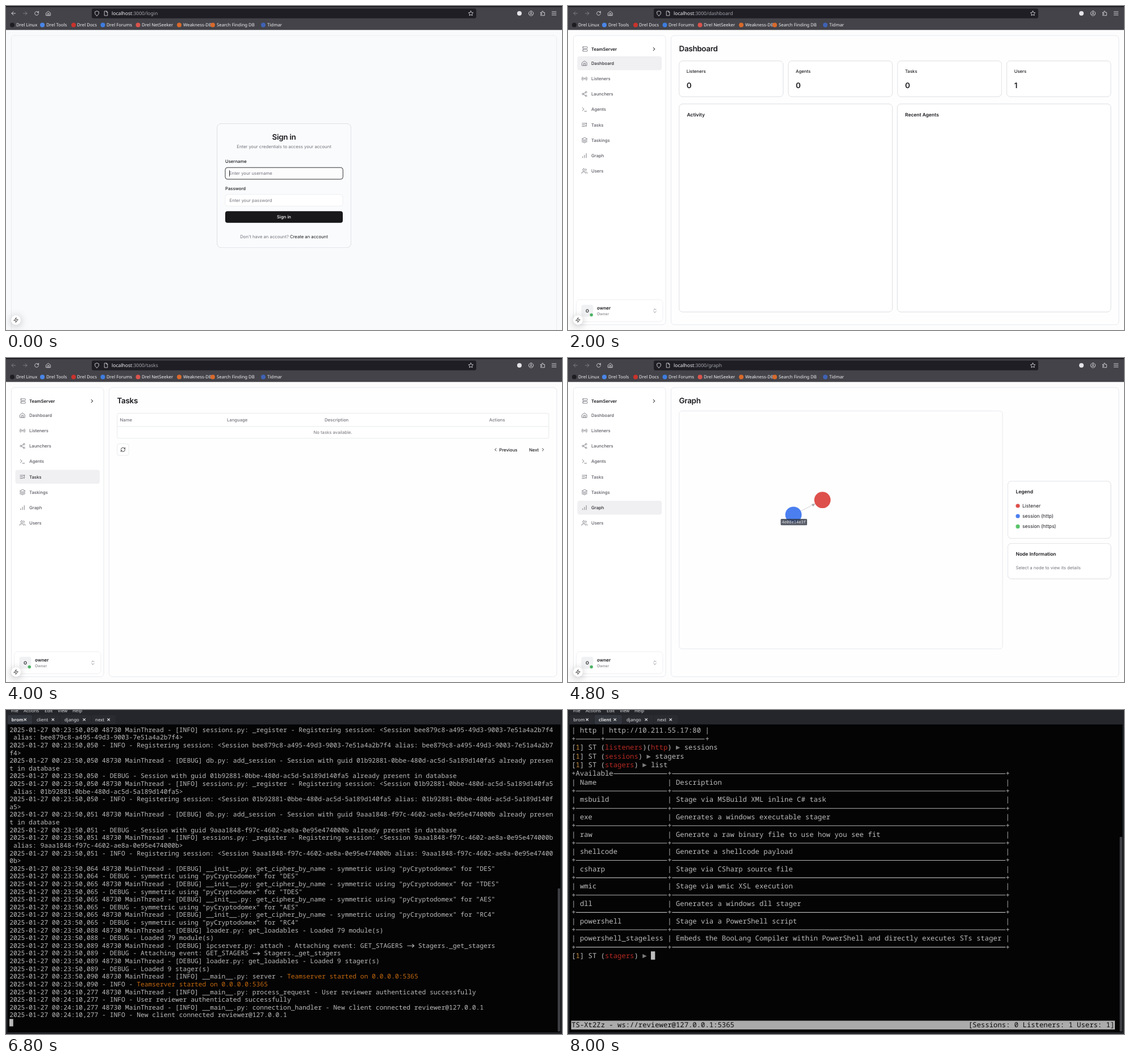
An HTML page that plays this animation: 979x572 px, repeating every 8.4 s.

```html
<!DOCTYPE html>
<html lang="en">
<head>
<meta charset="utf-8">
<title>Team server walkthrough</title>
<style>
  html, body { margin: 0; width: 100%; height: 100%; overflow: hidden; background: #fdfdfe; }
  svg { display: block; width: 979px; height: 572px; text-rendering: geometricPrecision; }
  text { white-space: pre; font-family: Inter, sans-serif; }
  .chrome { font-family: "Noto Sans", "Open Sans", sans-serif; }
  .code { font-family: "Liberation Mono", monospace; }
  .term { font-family: "Noto Sans Mono", "DejaVu Sans Mono", monospace; }
  .card { filter: drop-shadow(0 .7px .7px #0002); }
  .float { filter: drop-shadow(0 2px 7px #0004); }
</style>
</head>
<body>
<svg id="stage" viewBox="0 0 979 572"></svg>
<script>
const STEP = 400;
const INK = '#1b1b20', GREY = '#74747d', LINE = '#e5e7eb', SOFT = '#f0f1f3', BLUE = '#365fe2';

const ICONS = {
  home: 'M3 10 12 3l9 7v11H3zM9 21v-9h6v9',
  radio: 'M4.9 19.1C1 15.2 1 8.8 4.9 4.9M7.8 16.2c-2.3-2.3-2.3-6.1 0-8.5M16.2 7.8c2.3 2.3 2.3 6.1 0 8.5M19.1 4.9C23 8.8 23 15.1 19.1 19M12 10a2 2 0 1 0 .01 0',
  share: 'M18 2a3 3 0 1 0 .01 0M6 9a3 3 0 1 0 .01 0M18 16a3 3 0 1 0 .01 0M8.6 13.5l6.8 4M15.4 6.5l-6.8 4',
  prompt: 'M4 17l6-6-6-6M12 19h8',
  list: 'M3 6h18M3 12h10M3 18h10M19 6v12l-4-3',
  layers: 'M12 2 2 7l10 5 10-5zM2 12l10 5 10-5M2 17l10 5 10-5',
  bars: 'M5 20v-4M12 20V10M19 20V4',
  users: 'M16 21v-2a4 4 0 0 0-4-4H6a4 4 0 0 0-4 4v2M9 3a4 4 0 1 0 .01 0M22 21v-2a4 4 0 0 0-3-3.9M16 3.1a4 4 0 0 1 0 7.8',
  server: 'M4 2h16a2 2 0 0 1 2 2v4a2 2 0 0 1-2 2H4a2 2 0 0 1-2-2V4a2 2 0 0 1 2-2zM4 14h16a2 2 0 0 1 2 2v4a2 2 0 0 1-2 2H4a2 2 0 0 1-2-2v-4a2 2 0 0 1 2-2zM6 6h.1M6 18h.1',
  right: 'M9 18l6-6-6-6', left: 'M15 18l-6-6 6-6', down: 'M6 9l6 6 6-6',
  updown: 'M7 15l5 5 5-5M7 9l5-5 5 5',
  refresh: 'M3 12a9 9 0 0 1 9-9 9.75 9.75 0 0 1 6.7 2.7L21 8M21 3v5h-5M21 12a9 9 0 0 1-9 9 9.75 9.75 0 0 1-6.7-2.7L3 16M8 16H3v5',
  copy: 'M9 9h13v13H9zM5 15H2V2h13v3',
  plus: 'M5 12h14M12 5v14',
  back: 'M12 19l-7-7 7-7M20 12H5', forward: 'M12 5l7 7-7 7M4 12h15',
  bolt: 'M13 2 3 14h9l-1 8 10-12h-9z',
  gear: 'M12 9a3 3 0 1 0 .01 0M12 2l8.7 5v10L12 22l-8.7-5V7z',
  shield: 'M12 22s8-4 8-10V5l-8-3-8 3v7c0 6 8 10 8 10z',
  page: 'M14 2H5v20h14V7zM14 2v5h5',
  key: 'M6 8a4 4 0 1 0 .01 0M10 12h12v4M18 12v3',
  reload: 'M20 12a8 8 0 1 1-2.5-5.8L20 8M20 3v5h-5',
  star: 'M12 2l3.1 6.3 6.9 1-5 4.9 1.2 6.8-6.2-3.2L5.800 21 7 14.200 2 9.300l6.900-1z',
  account: 'M12 2a10 10 0 1 0 .01 0M12 7a3 3 0 1 0 .01 0M6 18c2-4 10-4 12 0',
  puzzle: 'M4 8h5V5a2.500 2.500 0 0 1 5 0v3h6v13H4v-5h3a2 2 0 0 0 0-4H4z',
  menu: 'M3 5h18M3 12h18M3 19h18'
};

const escapeText = s => s.replace(/&/g, '&amp;').replace(/</g, '&lt;').replace(/>/g, '&gt;');

// y is the vertical centre of the capitals
function text(str, x, y, { size = 7.7, fill = INK, weight = 400, anchor = 'start', cls = '', spacing = 0 } = {}) {
  return `<text class="${cls}" x="${x}" y="${y + size * .36}" font-size="${size}" fill="${fill}" font-weight="${weight}" text-anchor="${anchor}" letter-spacing="${spacing}">${escapeText(str)}</text>`;
}
const muted = (str, x, y, o) => text(str, x, y, { fill: GREY, ...o });
const strong = (str, x, y, o) => text(str, x, y, { weight: 500, ...o });
const middle = (str, x, y, o) => text(str, x, y, { anchor: 'middle', ...o });
const heading = (str, x, y, o) => text(str, x, y, { size: 13.4, weight: 600, spacing: -.28, ...o });
const cardTitle = (str, x, y) => text(str, x, y, { size: 8.45, weight: 600 });

const rect = (x1, y1, x2, y2, fill = 'none', r = 0, stroke = 'none', cls = '') =>
  `<rect class="${cls}" x="${x1}" y="${y1}" width="${x2 - x1}" height="${y2 - y1}" rx="${r}" fill="${fill}" stroke="${stroke}" stroke-width=".9"/>`;
const card = (x1, y1, x2, y2) => rect(x1, y1, x2, y2, '#fff', 6, '#e2e4e8', 'card');
const dot = (x, y, r, fill) => `<circle cx="${x}" cy="${y}" r="${r}" fill="${fill}"/>`;
const path = (d, stroke, width = 1) => `<path d="${d}" fill="none" stroke="${stroke}" stroke-width="${width}"/>`;
const icon = (name, x, y, size = 11, stroke = GREY, width = 2) =>
  `<path d="${ICONS[name]}" transform="translate(${x - size / 2} ${y - size / 2}) scale(${size / 24})" fill="none" stroke="${stroke}" stroke-width="${width}" stroke-linecap="round" stroke-linejoin="round"/>`;

function field(x1, y1, x2, value, fill = INK, stroke = LINE) {
  return rect(x1, y1, x2, y1 + 20.5, '#fff', 4, stroke) + text(value, x1 + 7.5, y1 + 10.3, { fill });
}
function button(x1, y1, x2, label, fill) {
  return rect(x1, y1, x2, y1 + 20.5, fill, 4) + middle(label, (x1 + x2) / 2, y1 + 10.3, { fill: '#fff', weight: 500 });
}
function tabBar(x1, y1, x2, labels) {
  const w = (x2 - x1) / labels.length;
  return rect(x1, y1, x2, y1 + 19.5, SOFT, 4) + rect(x1 + 1.7, y1 + 1.7, x1 + w - .7, y1 + 17.8, '#fff', 3, '#ececef') +
    labels.map((s, i) => middle(s, x1 + w * (i + .5), y1 + 9.7, { weight: 500, fill: i ? GREY : INK })).join('');
}

// ---- browser ----
const BOOKMARKS = [
  ['Drel Linux', 11, 18, '#1d1d22'], ['Drel Tools', 64, 71, '#4a86e8'], ['Drel Docs', 119, 125, '#c9332c'],
  ['Drel Forums', 170.5, 177, '#3d7de0'], ['Drel NetSeeker', 232.5, 239, '#d9534c'], ['Weakness-DB', 305, 312, '#d9692b'],
  ['Search Finding DB', 364, 371, '#d9692b'], ['Tidmar', 453, 460, '#3f62b5']
];
function browser(route, { canGoBack = false, key = false } = {}) {
  const light = '#e4e4e8', dim = '#85858c', x = key ? 202 : 186;
  const tools = [['reload', 54], ['home', 74.5], ['account', 924.5], ['puzzle', 945], ['menu', 965]];
  return rect(0, 0, 979, 42.3, '#434349') + rect(0, 0, 979, 1.8, '#1c1b22') + rect(151, 4.500, 828, 21.800, '#1f1e25', 3) +
    icon('back', 13, 13, 10.5, canGoBack ? light : dim) + icon('forward', 34, 13, 10.5, dim) +
    tools.map(([n, tx]) => icon(n, tx, 13, 10, light)).join('') + dot(904, 13, 4, light) +
    icon('shield', 160, 13, 10, light) + icon('page', 176, 13, 9.5, light) + icon('star', 818.500, 13, 10, light) +
    (key ? icon('key', 192, 13, 10, light) : '') +
    `<text class="chrome" x="${x}" y="16.300" font-size="8.55" fill="#a3a3ab"><tspan fill="#f4f4f6">localhost</tspan>:3000/${route}</text>` +
    BOOKMARKS.map(([s, ix, tx, c]) => dot(ix, 33.5, 4, c) + text(s, tx, 33.5, { size: 7.8, fill: '#f0f0f3', cls: 'chrome' })).join('');
}
const devBadge = `<circle class="float" cx="17.5" cy="554.500" r="8.500" fill="#fff"/>` + icon('bolt', 17.5, 554.5, 10, '#333');

// ---- application shell ----
const NAV = [['Dashboard', 'home'], ['Listeners', 'radio'], ['Launchers', 'share'], ['Agents', 'prompt'],
  ['Tasks', 'list'], ['Taskings', 'layers'], ['Graph', 'bars'], ['Users', 'users']];
function sidebar(active) {
  return rect(9.5, 52, 172, 562.8, '#fff', 6, LINE) +
    icon('server', 30, 76, 10) + text('TeamServer', 41, 76, { weight: 600 }) + icon('right', 151.5, 76, 10, INK, 2.500) +
    NAV.map(([name, ic], i) => {
      const y = 101 + 27.2 * i, on = name === active;
      return (on ? rect(16.5, y - 12.3, 165, y + 12.2, '#f0f0f2', 4) : '') + icon(ic, 29, y, 11) +
        strong(name, 41, y, { fill: on ? '#2c2c33' : '#5a5a63' });
    }).join('') +
    rect(14.5, 518.5, 167, 557.5, '#fff', 6, '#eceef1') + rect(23.5, 527.5, 44.5, 548.5, SOFT, 4) +
    middle('O', 34, 538, { weight: 600 }) + dot(41.2, 545.3, 3.6, '#fff') + dot(41.2, 545.3, 2.800, '#4fb466') +
    text('owner', 51, 533.5, { weight: 600, size: 8 }) + muted('Owner', 51, 543.2, { size: 6.7 }) + icon('updown', 153, 538, 10);
}
function app(active, route, content, { bottom = 562.8, scroll = 0, over = '', ...nav } = {}) {
  return rect(0, 0, 979, 572, '#fdfdfe') +
    `<g transform="translate(0 ${-scroll})">${rect(181.5, 52, 969.800, bottom, '#fefefe', 6, LINE)}${content}</g>` +
    sidebar(active) + devBadge + over + browser(route, nav);
}

// ---- pages ----
function login() {
  return rect(0, 0, 979, 572, '#f9fafc') + rect(9.5, 52, 969.5, 600, 'none', 6, '#e8eaee') +
    rect(371.8, 207.8, 607.300, 426.5, '#fafbfc', 7, '#e1e4e9', 'card') +
    heading('Sign in', 489.5, 231.3, { anchor: 'middle' }) +
    middle('Enter your credentials to access your account', 489.5, 247.8, { fill: GREY }) +
    strong('Username', 386, 274.5) + rect(386, 285.2, 593.3, 305.8, '#fcfcfd', 4, '#1d1d22') +
    muted('Enter your username', 393, 295.5) + path('M393.500 290v11', INK, .9) +
    strong('Password', 386, 322.2) + field(386, 332.8, 593, 'Enter your password', GREY, '#eceef1') +
    button(386, 362.2, 593, 'Sign in', '#18181b') +
    `<text x="489.5" y="409.500" font-size="7.7" fill="${GREY}" text-anchor="middle">Don't have an account? <tspan fill="${INK}">Create an account</tspan></text>` +
    devBadge + browser('login', { canGoBack: true });
}

function logsCard(y) {
  return card(209.3, y, 942.3, y + 250) + cardTitle('Server Logs', 223, y + 27) +
    rect(870, y + 18, 910.5, y + 39.5, '#fff', 4, LINE) + text('All', 877, y + 28.8) + icon('down', 899, y + 28.8, 9) +
    rect(915.5, y + 18.5, 928, y + 39, '#fff', 4, LINE) + icon('refresh', 921.8, y + 28.8, 9.500, INK) +
    rect(223, y + 52, 928, y + 236, '#fafafb', 4, LINE);
}
function teamServer(running) {
  const status = running ? 'Running' : 'Stopped';
  const stats = [['Connected Clients: 0', 731.5], ['Active Port: 6000', 817], ['Mode: WS', 891]];
  let out = heading('TeamServer', 195.5, 75.500) + card(209.3, 107, 942.3, 398.3) +
    icon('server', 230, 130, 15, INK) + heading('TeamServer Control Panel', 241, 130.3) +
    muted('Manage and monitor your TeamServer instance', 223, 148.2) +
    rect(223, 167.5, 278.3, 189, '#18181b', 10.7) + middle(status, 250.6, 178.5, { size: 10.2, weight: 600, fill: '#fff' }) +
    tabBar(223.3, 203, 928, ['Server Settings', 'Security']) +
    strong('IP Binding', 223, 235) + field(223.3, 246.5, 570.8, '0.0.0.0 (All Interfaces)') + icon('down', 559, 257, 9) +
    strong('Port', 580, 235) + field(580.2, 245.6, 928, '6000') +
    strong('Password', 223, 285) + field(223.3, 295.6, 570.8, '') +
    [0, 1, 2, 3, 4].map(i => dot(234.2 + 6.95 * i, 306.300, 3, INK)).join('') +
    strong('Advanced Options', 232.3, 339.8) +
    button(223, 363.300, 285.700, running ? 'Stop Server' : 'Start Server', running ? '#cd3a32' : '#18181b');
  if (!running) return out + logsCard(411.8);
  return out + muted('Uptime: 00:00:09', 287, 178.2) + stats.map(([s, x]) => text(s, x, 178.2)).join('') +
    card(209.3, 411.8, 942.3, 506.8) + cardTitle('Connection Details', 223, 430.6) +
    rect(223, 448.5, 324.5, 470.8, SOFT, 2) + text('ws://0.0.0.0:6000', 227.5, 459.8, { size: 9.13, cls: 'code' }) +
    rect(907.8, 449.8, 928, 469.8, '#fff', 4, LINE) + icon('copy', 917.8, 459.8, 9.5, INK) +
    text('Quick connect command:', 223, 486.2) + rect(320.3, 479.5, 496.3, 492.800, SOFT, 2) +
    text('teamserver connect ws://0.0.0.0:6000', 323, 486.2, { size: 7.92, cls: 'code' }) + logsCard(520.500);
}

function table(y, columns, row) {
  return rect(195.8, y, 955.8, y + 44.3, '#fff', 3, LINE) + path(`M196 ${y + 23.5}H955.500`, LINE, .9) +
    columns.map(([s, x]) => strong(s, x, y + 12, { fill: GREY })).join('') + middle(row, 575.500, y + 34, { fill: GREY });
}
const pager = y => icon('left', 862, y, 9, INK, 2.5) + strong('Previous', 868.5, y) + strong('Next', 921, y) + icon('right', 945.5, y, 9, INK, 2.5);
const refreshButton = (x, y) => rect(x, y, x + 20.5, y + 20.5, '#fff', 4, LINE) + icon('refresh', x + 10.2, y + 10.2, 9.500, INK);

const tablePage = (title, columns, row) => heading(title, 195.5, 75.5) + table(97.500, columns, row) + refreshButton(195.8, 151.500) + pager(161.8);

const listeners = heading('Listeners', 195.5, 75.5) + rect(195.5, 97.5, 316.5, 117.5, SOFT, 4) + rect(197.500, 99.500, 259, 115.800, '#fff', 3) +
  icon('radio', 209, 107.8, 9.500, INK) + strong('Listeners', 218, 107.8) + icon('gear', 270, 107.8, 9) + strong('Profiles', 279, 107.8, { fill: GREY }) +
  table(127.2, [['Status', 200.5], ['Name', 299], ['Listener Type', 389], ['Host', 561], ['Port', 639], ['Start Time', 711.5], ['Actions', 850.8]], 'No listeners available.') +
  rect(195.500, 181, 284.3, 201.3, BLUE, 4) + icon('plus', 209, 191.1, 9, '#fff') + strong('Create Listener', 218, 191.1, { fill: '#fff' }) +
  refreshButton(289, 181) + pager(191.1);

const dashboard = heading('Dashboard', 195.5, 75.5) +
  ['Listeners', 'Agents', 'Tasks', 'Users'].map((s, i) => {
    const x = 195.8 + 192.3 * i;
    return card(x, 97, x + 183, 160) + strong(s, x + 13, 115) + heading(i === 3 ? '1' : '0', x + 13, 140);
  }).join('') +
  card(195.8, 173, 571, 540) + cardTitle('Activity', 209.5, 192) + card(580, 173, 955.8, 540) + cardTitle('Recent Agents', 593.5, 192);

const graph = heading('Graph', 195.5, 75.5) + rect(195.8, 93.5, 765.3, 513.5, '#fefefe', 5, LINE) +
  path('M409 270.500 430 260', '#d2d2d4') + '<path d="M435.500 257l-3.800 5.200-3-4.200z" fill="#a9a9ad"/>' +
  dot(448, 250.7, 14.4, '#de504c') + dot(397, 276.8, 14.4, '#4b7ff0') + rect(374.500, 284, 421, 295.3, '#333947d0', 1.500) +
  middle('4e08e14e3f', 397.7, 289.8, { size: 7.05, fill: '#e4e4e8', cls: 'term' }) +
  card(774.5, 217.5, 955.8, 318.3) + cardTitle('Legend', 788.5, 236.3) +
  [['Listener', '#de504c'], ['session (http)', '#4b7ff0'], ['session (https)', '#5bc46c']].map(([s, c], i) =>
    dot(792, 261 + 18.2 * i, 3.600, c) + text(s, 800, 261 + 18.2 * i, { size: 8.5 })).join('') +
  card(774.5, 327.5, 955.8, 389.8) + cardTitle('Node Information', 788.5, 346.2) + muted('Select a node to view its details', 788.5, 369.8);

function required(label, x, y) {
  return `<text x="${x}" y="${y + 2.8}" font-size="7.7" font-weight="500" fill="${INK}">${label} <tspan fill="#e0433c">*</tspan></text>`;
}
const createListener = icon('back', 209, 76, 9, INK, 2.5) + strong('Back', 218, 76) + heading('Create Listener', 255.3, 76.5) +
  tabBar(195.5, 100.3, 955.5, ['HTTP Listener', 'HTTPS Listener', 'WMI Listener']) + card(195.8, 125.2, 955.8, 361.8) +
  strong('Description', 209.7, 146.4) + field(209.8, 157, 941.5, 'Listens on HTTP protocol.', '#8b8b93', '#f0f1f4') +
  required('Name', 209.7, 190.4) + field(209.8, 199, 941.5, 'Enter listener name', GREY) +
  required('BindAddress', 209.7, 232.4) + field(209.8, 241, 571, '0.0.0.0') +
  required('BindPort', 580, 232.4) + field(580.2, 241, 941.5, '80') +
  strong('Comms', 209.7, 278) + field(209.8, 288.5, 941.5, 'HTTP', '#8b8b93', '#f0f1f4') +
  button(898.5, 327, 941.5, 'Create', BLUE);

const usersPage = tablePage('Users', [['Username', 200.5], ['Role', 389], ['Status', 561], ['Last Login', 711.5], ['Actions', 850.8]], 'owner');
const userDrawer = rect(-2, 379.5, 981, 580, '#fff', 6, LINE) + rect(460, 387, 519, 391, SOFT, 2) +
  heading('Create User', 489.500, 410, { anchor: 'middle' }) + strong('Username', 386, 436) + field(386, 445, 593, 'Enter username', GREY) +
  strong('Password', 386, 480) + field(386, 489, 593, 'Enter password', GREY) + button(386, 524, 593, 'Create', '#18181b');

// ---- terminal ----
// {x|words} colours words; runs of dashes and "->" are drawn as joined strokes
const TONES = { o: '#c4690f', n: '#c08a3a', r: '#b52a22', g: '#7d7d7d' };
function console_(rows, { cell, leading, top }) {
  const left = 6.2;
  return rows.map((row, r) => {
    const y = top + r * leading;
    const plain = row.replace(/\{\w\|(.*?)\}/g, '$1');
    const strokes = [...plain.matchAll(/-{4,}|->/g)].map(m => {
      const x1 = left + m.index * cell, x2 = x1 + m[0].length * cell - 1;
      return path(`M${x1 + .5} ${y + .5}H${x2}` + (m[0] === '->' ? `m-3.500-3 3.500 3-3.500 3` : ''), '#b4b4b4', 1.1);
    }).join('');
    const body = escapeText(row.replace(/-{4,}|->/g, m => ' '.repeat(m.length)))
      .replace(/\{(\w)\|(.*?)\}/g, (_, tone, s) => `<tspan fill="${TONES[tone]}">${s}</tspan>`);
    return `<text class="term" x="${left}" y="${y + cell * .6}" font-size="${cell / .6}" fill="#bcbcbc">${body}</text>` + strokes;
  }).join('');
}
function terminal(active, thumb, content) {
  const tabs = [['brom', 9.5, 3, 46], ['client', 54, 47, 95], ['django', 103, 96, 150], ['next', 157, 151, 193]];
  return rect(0, 0, 979, 572, '#24262b') +
    [['File', 9], ['Actions', 31], ['Edit', 68], ['View', 91], ['Help', 117]].map(([s, x]) => text(s, x, 1, { size: 7.9, fill: '#dcdcde', cls: 'chrome' })).join('') +
    tabs.map(([s, x, x1, x2]) => {
      const on = s === active;
      return rect(x1, 9, x2, 25, on ? '#33363d' : '#292b31', 2) +
        text(s, x, 17, { size: 7.9, fill: '#e2e2e4', weight: on ? 700 : 400, cls: 'chrome' }) +
        path(`M${x2 - 14.500} 14.800l4.400 4.400m0-4.400l-4.400 4.400`, '#e2e2e4', 1.2);
    }).join('') +
    rect(2.5, 25.500, 976.5, 569, '#040405') + rect(971.5, thumb, 975.8, 567.500, '#3f4147', 1) + content;
}

function serverLog() {
  const rows = [], columns = 141;
  const log = (time, level, file, call, message) => {
    const stamp = `2025-01-27 00:${time}`;
    for (const line of [`${stamp} 48730 MainThread - [${level}] ${file}.py: ${call} - ${message}`, `${stamp} - ${level} - ${message}`])
      if (line.length <= columns) rows.push(line);
      else rows.push(line.slice(0, columns), line.slice(columns));
  };
  const add = (ms, id) => log(`23:50,${ms}`, 'DEBUG', 'db', 'add_session', `Session with guid ${id} already present in database`);
  const register = (ms, id) => log(`23:50,${ms}`, 'INFO', 'sessions', '_register', `Registering session: <Session ${id} alias: ${id}>`);
  const second = '01b92881-0bbe-480d-ac5d-5a189d140fa5', third = '9aaa1848-f97c-4602-ae8a-0e95e474000b';
  register('050', 'bee879c8-a495-49d3-9003-7e51a4a2b7f4');
  add('050', second); register('050', second);
  add('051', third); register('051', third);
  ['DES', 'TDES', 'AES', 'RC4'].forEach((name, i) =>
    log(`23:50,06${i ? 5 : 4}`, 'DEBUG', '__init__', 'get_cipher_by_name', `symmetric using "pyCryptodomex" for "${name}"`));
  log('23:50,088', 'DEBUG', 'loader', 'get_loadables', 'Loaded 79 module(s)');
  log('23:50,089', 'DEBUG', 'ipcserver', 'attach', 'Attaching event: GET_STAGERS -> Stagers._get_stagers');
  log('23:50,089', 'DEBUG', 'loader', 'get_loadables', 'Loaded 9 stager(s)');
  log('23:50,090', 'INFO', '__main__', 'server', '{o|Teamserver started on 0.0.0.0:5365}');
  log('24:10,277', 'INFO', '__main__', 'process_request', 'User reviewer authenticated successfully');
  log('24:10,277', 'INFO', '__main__', 'connection_handler', 'New client connected reviewer@127.0.0.1');
  return terminal('brom', 315, console_(rows, { cell: 6.794, leading: 13.61, top: 34.7 }) + rect(6, 545.5, 12.7, 558.5, '#b9b9b9'));
}

const CLIENT = { cell: 7.356, leading: 15.31, top: 35.4 };
function prompt(context, command) {
  const scope = context ? ' ' + context.split(' ').map(s => `({r|${s}})`).join('') : '';
  return `[{n|1}] ST${scope} {g|►} ${command}`;
}
function grid(widths, rows, title = '') {
  const rule = '+' + widths.map(w => '-'.repeat(w)).join('+') + '+';
  const lines = rows.map(row => '|' + row.map((s, i) => (' ' + s).padEnd(widths[i])).join('|') + '|');
  const first = '+' + title + rule.slice(1 + title.length);
  return [first, ...lines.flatMap(line => [line, rule])];
}
function client(rows, listenerCount, thumb) {
  const last = rows.length - 1, { cell, leading, top } = CLIENT;
  const column = rows[last].replace(/\{\w\|(.*?)\}/g, '$1').length;
  const x = 6.2 + column * cell, y = top + last * leading, statusY = top + 34 * leading;
  const status = (s, sx) => text(s, sx, statusY, { size: cell / .6, fill: '#0b0b0b', cls: 'term' });
  return terminal('client', thumb, console_(rows, CLIENT) + rect(x, y - 7.300, x + cell, y + 7.300, '#bcbcbc') +
    rect(5.5, 548.5, 963, 564, '#ababab') + status('TS-Xt2Zz - ws://reviewer@127.0.0.1:5365', 6.2) +
    status(`[Sessions: 0 Listeners: ${listenerCount} Users: 1]`, 6.2 + 95 * cell));
}

const greeting = ['TS-Xt2Zz connected', ''];
const running = grid([6, 24], [['Type', 'URL'], ['http', 'http://10.211.55.17:80']], 'Running');
const setup = [...greeting, prompt('', 'listeners'), prompt('listeners', 'use http'), prompt('listeners http', 'options'),
  ...grid([14, 10, 18, 45], [['Option Name', 'Required', 'Value', 'Description'], ['Name', 'True', 'http', 'Name for the listener.'],
    ['BindIP', 'True', '10.211.55.17', 'The IPv4 address to bind to.'], ['Port', 'True', '80', 'Port for the listener.']], 'Options'),
  prompt('listeners http', 'start'), prompt('listeners http', 'list'), ...running, prompt('listeners http', '')];
const stagers = [...running.slice(-2), prompt('listeners http', 'sessions'), prompt('sessions', 'stagers'), prompt('stagers', 'list'),
  ...grid([22, 80], [['Name', 'Description'], ['msbuild', 'Stage via MSBuild XML inline C# task'], ['exe', 'Generates a windows executable stager'],
    ['raw', 'Generate a raw binary file to use how you see fit'], ['shellcode', 'Generate a shellcode payload'],
    ['csharp', 'Stage via CSharp source file'], ['wmic', 'Stage via wmic XSL execution'], ['dll', 'Generates a windows dll stager'],
    ['powershell', 'Stage via a PowerShell script'],
    ['powershell_stageless', 'Embeds the BooLang Compiler within PowerShell and directly executes STs stager']], 'Available'),
  prompt('stagers', '')];

// ---- timeline: each scene lasts its number of steps ----
const scenes = [
  login(),
  app('Dashboard', 'dashboard', dashboard, { canGoBack: true }),
  app('', 'teamserver', teamServer(false), { bottom: 676 }),
  app('', 'teamserver', teamServer(true), { bottom: 784, key: true }),
  app('', 'teamserver', teamServer(true), { bottom: 784, key: true, scroll: 221 }),
  app('Dashboard', 'dashboard', dashboard),
  app('Dashboard', 'dashboard', dashboard, { scroll: 60, bottom: 622 }),
  app('Listeners', 'listeners', listeners),
  app('Launchers', 'launchers', tablePage('Launchers', [['Name', 200.5], ['Description', 389], ['Actions', 850.8]], 'No launchers available.')),
  app('Agents', 'agents', tablePage('Agents', [['Status', 200.5], ['Name', 299], ['Type', 389], ['Host', 561], ['User', 639], ['Last Seen', 711.5], ['Actions', 850.8]], '4e08e14e3f')),
  app('Tasks', 'tasks', tablePage('Tasks', [['Name', 200.5], ['Language', 389], ['Description', 561], ['Actions', 850.8]], 'No tasks available.')),
  app('Taskings', 'taskings', tablePage('Taskings', [['Status', 200.5], ['Agent', 389], ['Task', 561], ['Time', 711.5], ['Actions', 850.8]], 'No taskings available.')),
  app('Graph', 'graph', graph),
  app('Users', 'users', usersPage),
  app('Users', 'users', usersPage, { over: userDrawer }),
  app('Listeners', 'listeners', listeners, { canGoBack: true }),
  app('', 'listeners/create', createListener, { canGoBack: true }),
  serverLog(),
  client([...greeting, prompt('', '')], 0, 224),
  client(setup, 1, 224),
  client(stagers, 1, 224)
];

const stage = document.getElementById('stage');
const start = performance.now();
let shown = -1;
function tick() {
  const index = Math.floor((performance.now() - start) / STEP) % scenes.length;
  if (index !== shown) stage.innerHTML = scenes[shown = index];
  requestAnimationFrame(tick);
}
tick();
</script>
</body>
</html>
```
